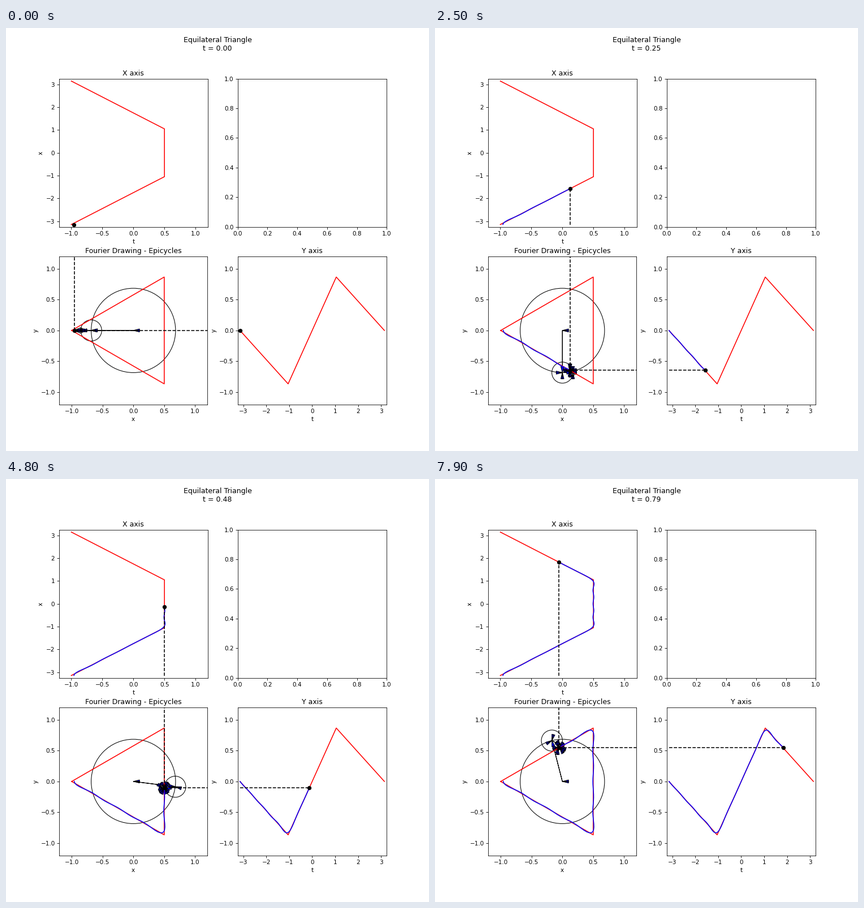
Animation, 748 px wide and 748 px high, one loop 8 s. Source, as a matplotlib script:

```python
import numpy as np
import matplotlib.pyplot as plt
from matplotlib.animation import FuncAnimation

FRAMES = 80
STEP = 0.01
ORDER = 10
LIM = 1.2
T_LIM = np.pi + 0.1

# Epicycle order: 0, 1, -1, 2, -2, ...
freqs = np.array([0] + [s * n for n in range(1, ORDER + 1) for s in (1, -1)])


def coefficient(n):
    """Fourier coefficient of a triangle inscribed in the unit circle."""
    sign = 1 if n % 2 else -1
    if n % 3 == 1:
        return sign * 27 / (4 * np.pi**2) / n**2
    return sign * 1e-4  # leftover of numerical integration


coefs = np.array([coefficient(n) for n in freqs])


def chain(t):
    """Joints of the epicycle chain, starting at the centre."""
    return np.concatenate([[0], np.cumsum(coefs * np.exp(1j * freqs * t))])


times = -np.pi + 2 * np.pi * STEP * np.arange(FRAMES)
joints = [chain(t) for t in times]
tips = np.array([j[-1] for j in joints])

corner_t = np.array([-np.pi, -np.pi / 3, np.pi / 3, np.pi])
corners = np.exp(1j * corner_t)

fig, ((ax_x, ax_empty), (ax_e, ax_y)) = plt.subplots(
    2, 2, figsize=(10, 10), dpi=74.8)
title = fig.suptitle("")


def setup(ax, name, xlabel, ylabel, xlim, ylim, xs, ys):
    """Label an axes, draw the ideal curve and return the moving artists."""
    ax.set(title=name, xlabel=xlabel, ylabel=ylabel)
    ax.plot(xs, ys, "r-")
    trace, = ax.plot([], [], "b-")
    guides = [ax.plot([], [], "k--")[0] for _ in range(2)]
    dot, = ax.plot([], [], "ko")
    ax.set_xlim(-xlim, xlim)
    ax.set_ylim(-ylim, ylim)
    return trace, guides, dot


view_x = setup(ax_x, "X axis", "t", "x", LIM, T_LIM, corners.real, corner_t)
view_y = setup(ax_y, "Y axis", "t", "y", T_LIM, LIM, corner_t, corners.imag)
view_e = setup(ax_e, "Fourier Drawing - Epicycles", "x", "y", LIM, LIM,
               corners.real, corners.imag)
ax_e.set_aspect("equal")

arrows, circles = [], []
for c in coefs:
    circles.append(ax_e.add_patch(plt.Circle((0, 0), abs(c), fill=False)))
    arrows.append(ax_e.arrow(0, 0, c, 0, head_width=0.05, head_length=0.1,
                             length_includes_head=True, fc="b", ec="k"))
ax_e.set(xlim=(-LIM, LIM), ylim=(-LIM, LIM))


def show(view, xs, ys, *guide_lines):
    trace, guides, dot = view
    trace.set_data(xs, ys)
    dot.set_data(xs[-1:], ys[-1:])
    for guide, line in zip(guides, guide_lines):
        guide.set_data(*line)


def update(i):
    t, now = times[i], times[:i + 1]
    xs, ys = tips.real[:i + 1], tips.imag[:i + 1]
    x, y = xs[-1], ys[-1]

    chain_now = joints[i]
    for arrow, circle, a, b in zip(arrows, circles, chain_now, chain_now[1:]):
        d = b - a
        arrow.set_data(x=a.real, y=a.imag, dx=d.real, dy=d.imag)
        circle.center = a.real, a.imag

    show(view_x, xs, now, ([x, x], [-np.pi, t]))
    show(view_y, now, ys, ([-np.pi, t], [y, y]))
    show(view_e, xs, ys, ([x, x], [y, LIM]), ([x, LIM], [y, y]))
    title.set_text(f"Equilateral Triangle\nt = {i * STEP:.2f}")


anim = FuncAnimation(fig, update, frames=FRAMES, interval=100,
                     repeat=True, repeat_delay=0)
plt.show()
```
